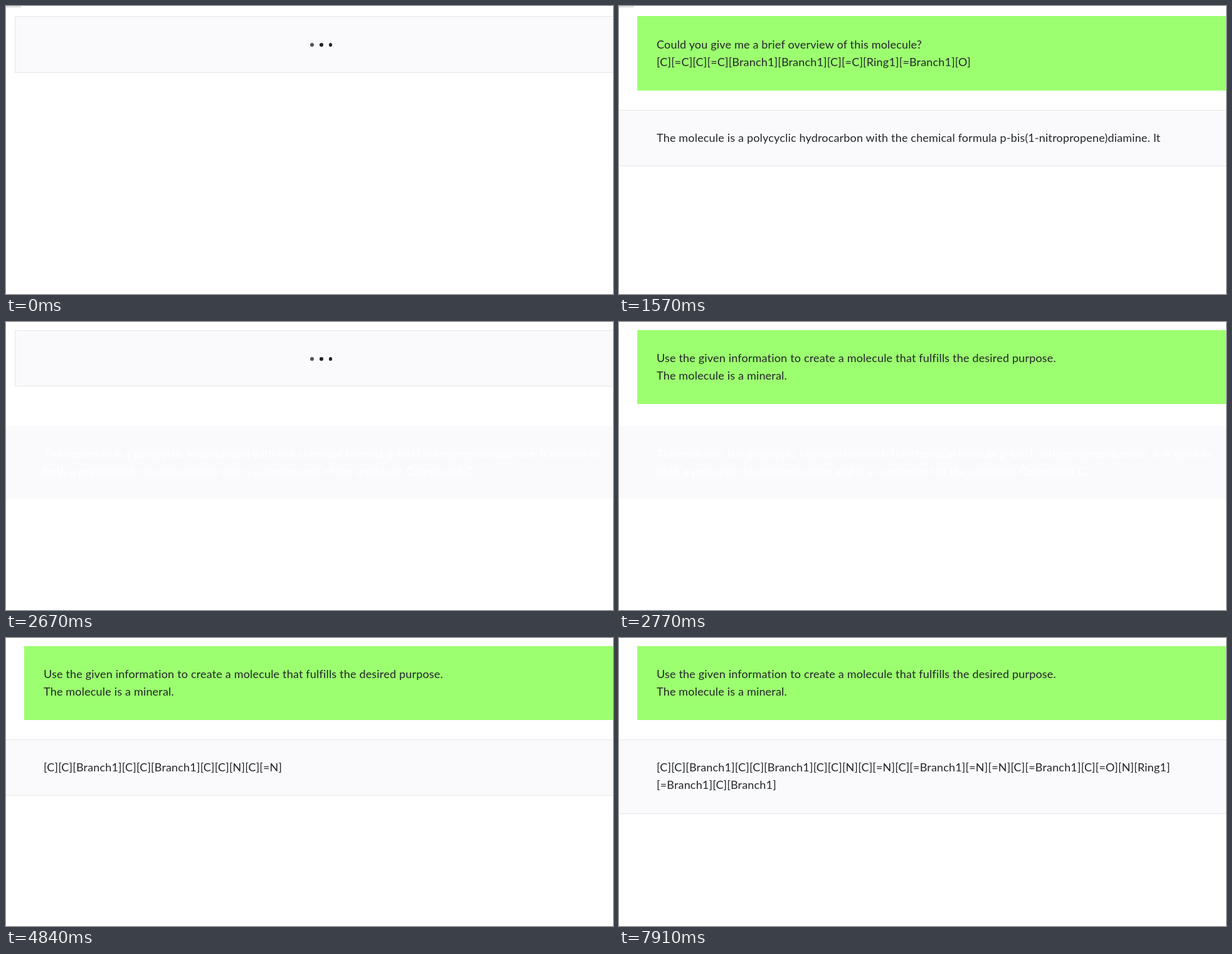
An HTML page that plays this animation: 968 px wide and 460 px high, repeating every 8 s.

```html
<!DOCTYPE html>
<html lang="en">
<head>
<meta charset="utf-8">
<title>Molecule chat</title>
<style>
  html, body { margin: 0; width: 100%; height: 100%; overflow: hidden; background: #fff; }
  #stage { position: relative; width: 968px; height: 460px; overflow: hidden; }
  #stage > div { position: absolute; box-sizing: border-box; }
  .card { background: #fafafc; border: 1px solid #e6e6e9; }
  .text {
    font: 18px/28px Lato, "Open Sans", sans-serif;
    letter-spacing: .18px; white-space: pre; color: #22262b;
  }
  #corner { left: 0; top: 0; width: 24px; height: 3px; background: linear-gradient(#d6d6d8, #f4f4f4); }
  #loader { left: 14px; width: 980px; }
  #loader i {
    position: absolute; width: 5.6px; height: 5.6px; top: 42px;
    border-radius: 50%; background: #222;
  }
  #user { left: 29px; width: 960px; background: #9cff6f; padding: 31px; }
  #user .text { position: absolute; left: 31px; }
  #answer { left: -10px; width: 990px; padding: 29px 0 0 69px; }
  #answer.faded { color: #fff; border-color: transparent; }
  [hidden] { display: none; }
</style>
</head>
<body>
<div id="stage">
  <div id="corner"></div>
  <div id="answer" class="card text"></div>
  <div id="user"><div class="text"></div></div>
  <div id="loader" class="card">
    <i style="left:470.4px;background:#555"></i><i style="left:485.2px"></i><i style="left:499.9px"></i>
  </div>
</div>
<script>
const LOOP = 8000;
const $ = id => document.getElementById(id);
const corner = $('corner'), loader = $('loader'), user = $('user'), answer = $('answer');
const question = user.firstElementChild;

// Tokens spread evenly from one time to another.
const evenly = (tokens, from, to) =>
  tokens.map((text, i) => ({ text, at: from + (to - from) * i / (tokens.length - 1) }));
const split = s => s.split('|');

const scenes = [
  {
    start: 0, asked: 30, opened: 330, shift: 0, userTop: 16, loaderHeight: 91, tall: 116,
    question: 'Could you give me a brief overview of this molecule?\n' +
      '[C][=C][C][=C][Branch1][Branch1][C][=C][Ring1][=Branch1][O]',
    tokens: [
      ...evenly(split('The| molecule| is| a| poly|cyclic| hydro|carbon| with| the| chemical'), 470, 830),
      ...evenly(split(' formula| p|-|bis|(|1|-|nit|rop|rop|ene|)|diam|ine|.'), 870, 1430),
      ...evenly(split(' It| is| used| as|\nboth| a| precursor| to| di|amino|but|ane| and| is| a' +
        '| component| of| the| anti|biotic| Compound| C|.'), 1570, 2370)
    ]
  },
  {
    start: 2670, asked: 2770, opened: 3070, shift: -4, userTop: 13, loaderHeight: 90, tall: 119,
    question: 'Use the given information to create a molecule that fulfills the desired purpose.\n' +
      'The molecule is a mineral.',
    tokens: [
      ...evenly(['[C]', '[C]', '[Branch1]'], 3270, 3570),
      ...evenly(['[C]', '[C]', '[Branch1]'], 3670, 3940),
      ...evenly(['[C]', '[C]', '[N]', '[C]', '[=N]'], 4300, 4840),
      ...evenly(['[C]', '[=Branch1]', '[=N]'], 5070, 5610),
      ...evenly(['[=N]', '[C]'], 5740, 5870),
      ...evenly(['[=Branch1]', '[C]', '[=O]'], 6210, 6670),
      ...evenly(['[N]', '[Ring1]', '\n[=Branch1]', '[C]', '[Branch1]'], 6810, 7810)
    ]
  }
];

const setBox = (el, top, height) => {
  el.style.top = top + 'px';
  el.style.height = height + 'px';
};
const setText = (el, text) => { if (el.textContent !== text) el.textContent = text; };

function drawAnswer(scene, t) {
  const text = scene.tokens.filter(k => k.at <= t).map(k => k.text).join('');
  const twoLines = text.includes('\n');
  setText(answer, text);
  setBox(answer, 166 + scene.shift, twoLines ? scene.tall : 90);
  answer.style.borderBottomColor = twoLines && !scene.shift ? '#f3f3f5' : '';
}

function draw(t) {
  const index = t < scenes[1].start ? 0 : 1;
  const scene = scenes[index];
  const asked = t >= scene.asked, opened = t >= scene.opened;
  // The previous answer lingers as pale text while the next question loads.
  const lingering = index === 1 && t < 2870;

  corner.hidden = index === 1;
  loader.hidden = asked;
  setBox(loader, scene.userTop, scene.loaderHeight);

  user.hidden = !asked;
  setBox(user, scene.userTop, 135 + scene.shift - scene.userTop);
  question.style.top = 47 + scene.shift - scene.userTop + 'px';
  setText(question, scene.question);

  answer.hidden = !opened && !lingering;
  answer.classList.toggle('faded', lingering);
  drawAnswer(lingering ? scenes[0] : scene, t);
  if (lingering) answer.style.borderBottomColor = '';
}

const begin = performance.now();
function tick() {
  draw((performance.now() - begin) % LOOP);
  requestAnimationFrame(tick);
}
draw(0);
requestAnimationFrame(tick);
</script>
</body>
</html>
```
